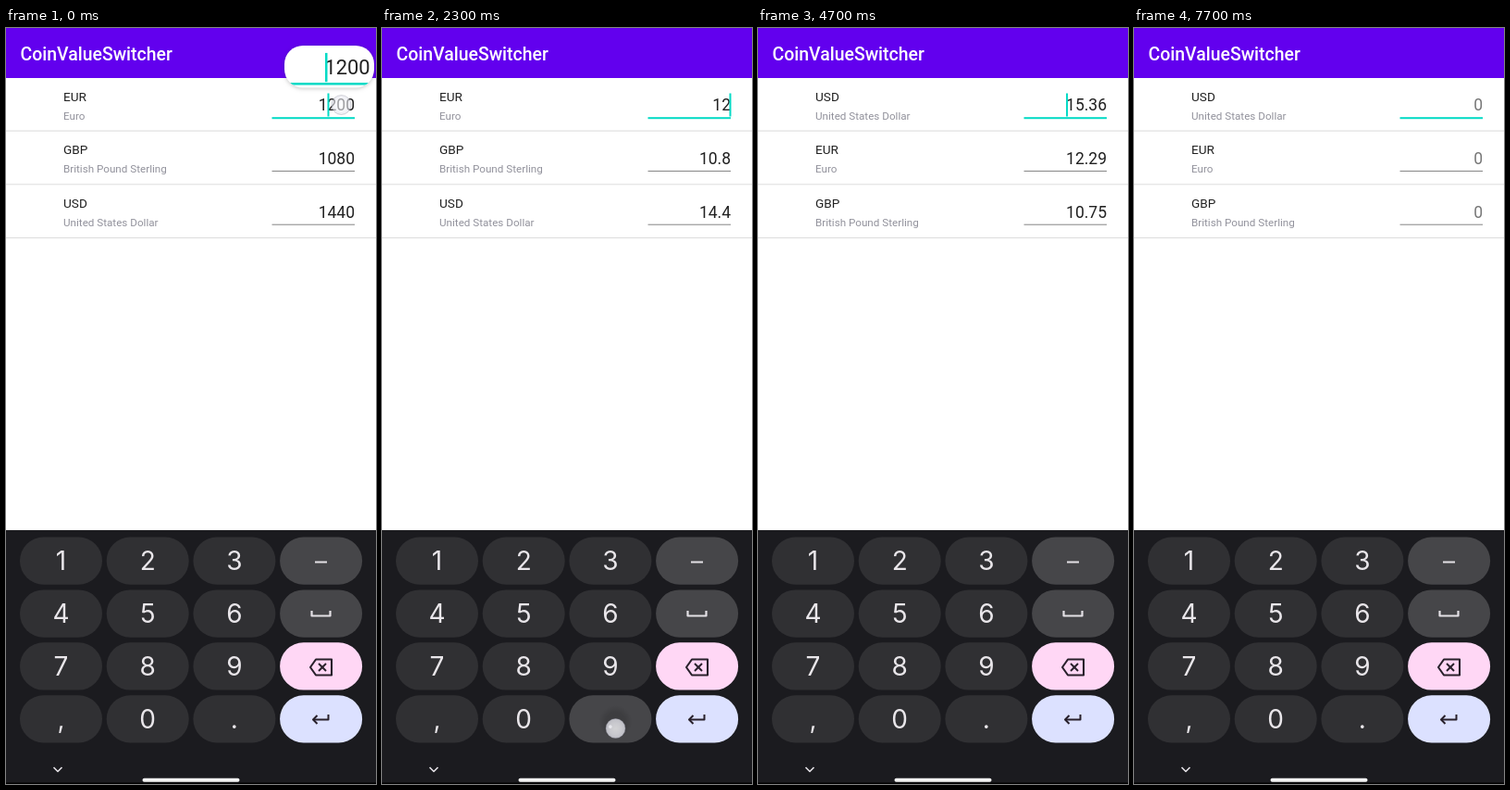
An HTML page with a canvas that plays this animation: 400x816 px, repeating every 8000 ms.

```html
<!DOCTYPE html>
<html lang="en">
<head>
<meta charset="utf-8">
<title>Currency list</title>
<style>
html, body { margin: 0; width: 100%; height: 100%; overflow: hidden; background: #fff; }
canvas { display: block; width: 400px; height: 816px; }
</style>
</head>
<body>
<canvas id="stage"></canvas>
<script>
const W = 400, H = 816, LOOP = 8000, STEP = 100;
const TEAL = '#03dac5', INK = '#212121';
const TOP = 53.5, PITCH = 57.75, RIGHT = 377, KEYBOARD = 542;
const FIELD_FONT = '17.5px Roboto, sans-serif';
const LAG = 100, DRAG = 400, HOVER = 300, LINGER = 230;
const KEYS = '123-456_789<,0.>';
const NAMES = { EUR: 'Euro', GBP: 'British Pound Sterling', USD: 'United States Dollar' };
const RATES = { EUR: { GBP: 0.9, USD: 1.2 }, USD: { EUR: 0.8, GBP: 0.7 } };

// What the finger does; everything else follows from it
const tap = (t, x, y) => ({ t, x, y });
const erase = t => tap(t, 341, 688);
const GESTURES = [
  { t: 0, drag: true },
  erase(1200), erase(1400),
  tap(2300, 252.5, 756), tap(2900, 152, 697),
  tap(3700, 203.5, 192),
  tap(5200, 360, 84),
  { t: 5900, drag: true },
  ...Array.from({ length: 5 }, (_, i) => erase(6900 + 140 * i))
];

const canvas = document.getElementById('stage');
const ctx = canvas.getContext('2d');
const dpr = window.devicePixelRatio || 1;
canvas.width = W * dpr;
canvas.height = H * dpr;

const clamp = v => Math.min(1, Math.max(0, v));
const mix = (a, b, p) => a + (b - a) * p;

const keyAt = ({ x, y }) => y > KEYBOARD
  ? Math.floor((y - 547) / 57) * 4 + Math.floor((x - 13) / 93.7) : -1;

function caretX(typed, n) {
  ctx.font = FIELD_FONT;
  return Math.min(RIGHT - 1.5, RIGHT - ctx.measureText(typed.slice(n)).width);
}

function convert(typed, from, to) {
  if (from === to || typed === '') return typed;
  return String(+(parseFloat(typed) * RATES[from][to]).toFixed(2));
}

function applyDrag(s, age) {
  const p = clamp(age / (DRAG - LAG));
  s.x = mix(s.x, caretX(s.typed, s.typed.length), p);
  s.n = s.typed.length;
  s.touched += Math.min(age, DRAG);
  s.handle = age < DRAG ? 0 : 1;
  if (age < DRAG) s.lens = s.x - 9.4 * (1 - p);
}

function applyTap(s, g, age) {
  const key = keyAt(g);
  if (key >= 0) s.handle *= clamp(1 - age / 130);
  if (age < LAG) return;
  const row = Math.floor((g.y - TOP) / PITCH);
  if (key >= 0) {
    s.typed = KEYS[key] === '<' ? s.typed.slice(0, -1) : s.typed + KEYS[key];
    s.n = s.typed.length;
  } else if (row > 0) {
    s.before = { order: s.order, typed: s.typed, age: age - LAG };
    const code = s.order[row];
    s.typed = convert(s.typed, s.order[0], code);
    s.order = [code, ...s.order.filter(c => c !== code)];
    s.n = 0;
  } else {
    s.n = [...s.typed].filter((_, i) =>
      (caretX(s.typed, i) + caretX(s.typed, i + 1)) / 2 < g.x).length;
    s.handle = 1;
  }
  s.x = caretX(s.typed, s.n);
}

function stateAt(t) {
  const s = { order: ['EUR', 'GBP', 'USD'], typed: '1200', n: 1, handle: 0, lens: 0 };
  s.x = caretX(s.typed, s.n);
  for (const g of GESTURES.filter(g => g.t <= t)) {
    s.touched = g.t;
    if (g.drag) applyDrag(s, t - g.t);
    else applyTap(s, g, t - g.t);
  }
  s.caret = s.typed && (t - s.touched) % 1000 < 500 ? s.x : 0;
  return s;
}

function text(str, x, y, font, color, align = 'left') {
  ctx.font = font;
  ctx.fillStyle = color;
  ctx.textAlign = align;
  ctx.fillText(str, x, y);
}

function rect(x, y, w, h, color) {
  ctx.fillStyle = color;
  ctx.fillRect(x, y, w, h);
}

function pill(x, y, w, h, r, color) {
  ctx.beginPath();
  ctx.roundRect(x, y, w, h, r);
  ctx.fillStyle = color;
  ctx.fill();
}

function line(points, color, width, closed) {
  ctx.beginPath();
  points.forEach(([x, y]) => ctx.lineTo(x, y));
  if (closed) ctx.closePath();
  ctx.strokeStyle = color;
  ctx.lineWidth = width;
  ctx.lineJoin = 'round';
  ctx.stroke();
}

function drawField(value, y, focused, caret) {
  text(value || '0', RIGHT, y + 35.7, FIELD_FONT, value ? INK : '#777', 'right');
  rect(287.5, y + 42.7, 89.5, focused ? 2 : 1, focused ? TEAL : '#858585');
  if (caret) rect(caret, y + 17, 2, 25, TEAL);
}

function drawRow(code, value, y, focused, caret) {
  rect(0, y, W, PITCH, '#fff');
  text(code, 62, y + 25, '13.6px Roboto, sans-serif', INK);
  text(NAMES[code], 62, y + 45, '11.67px Roboto, sans-serif', '#92929c');
  drawField(value, y, focused, caret);
  rect(0, y + PITCH - 0.7, W, 1, '#dcdcdc');
}

function drawList({ order, typed, before, caret }) {
  const old = before || { order, typed, age: LOOP };
  const p = clamp((old.age - 58) / 250);
  const ease = 0.5 - Math.cos(Math.PI * p) / 2;
  const rowY = i => TOP + PITCH * mix(old.order.indexOf(order[i]), i, ease);
  const src = old.age < 500 ? old : { order, typed };
  drawRow(order[0], typed, rowY(0), false, 0);
  for (const i of [2, 1]) {
    drawRow(order[i], convert(src.typed, src.order[0], order[i]), rowY(i), false, 0);
  }
  drawRow(order[0], typed, TOP, true, caret);
}

function drawHandle({ x, handle }) {
  const r = 9.7, y = 107.5, d = r * Math.SQRT1_2;
  ctx.globalAlpha = handle;
  ctx.beginPath();
  ctx.moveTo(x, y - 2 * d);
  ctx.lineTo(x + d, y - d);
  ctx.arc(x, y, r, -Math.PI / 4, Math.PI * 1.25);
  ctx.fillStyle = TEAL;
  ctx.fill();
  ctx.globalAlpha = 1;
}

function drawLens({ typed, lens }) {
  if (!lens) return;
  ctx.save();
  ctx.shadowColor = 'rgba(0,0,0,.22)';
  ctx.shadowBlur = 4 * dpr;
  ctx.shadowOffsetY = dpr;
  pill(301, 19, 97, 45.5, 20, '#fff');
  ctx.restore();
  ctx.save();
  ctx.clip();
  ctx.translate(349.5, 50.3);
  ctx.scale(1.25, 1.25);
  ctx.translate(-lens - 3.6, -TOP - 35.7);
  drawField(typed, TOP, true, lens);
  ctx.restore();
}

function keyColor(i, pressed) {
  if (KEYS[i] === '<') return pressed ? '#9aa8e4' : '#ffd7f5';
  if (KEYS[i] === '>') return '#dce1ff';
  return i % 4 === 3 || pressed ? '#464649' : '#303033';
}

function drawKeyboard(t) {
  rect(0, KEYBOARD, W, H, '#1b1b1f');
  rect(0, 814.5, W, 2, '#000');
  const down = GESTURES.filter(g => t >= g.t && t < g.t + 200).map(keyAt);
  [...KEYS].forEach((label, i) => {
    const x = 15 + (i % 4) * 93.7, y = 549.5 + Math.floor(i / 4) * 56.9;
    pill(x, y, 89, 51.3, 25.6, keyColor(i, down.includes(i)));
    if (i % 4 < 3) text(label, x + 44.5, y + 35.6, '28px Inter, sans-serif', '#e9e6ea', 'center');
  });
  const light = '#e4e1e6', dark = '#28202b';
  rect(334, 575.5, 13, 2, light);
  line([[330.5, 629], [330.5, 634.5], [350.5, 634.5], [350.5, 629]], light, 2.2);
  line([[329, 690], [335, 681.5], [352, 681.5], [352, 698.5], [335, 698.5]], dark, 2.1, true);
  line([[338, 686], [346, 694]], dark, 2);
  line([[346, 686], [338, 694]], dark, 2);
  line([[348.5, 741], [348.5, 746.5], [332, 746.5]], dark, 2);
  line([[336.5, 742], [332, 746.5], [336.5, 751]], dark, 2);
  line([[51.5, 798], [56, 802.5], [60.5, 798]], light, 1.6);
  pill(147.5, 809.7, 105, 4, 2, '#f4f4f4');
}

function glow(x, y, r, inner, mid, outer) {
  const g = ctx.createRadialGradient(x, y, 0, x, y, r);
  [inner, mid, outer].forEach((color, i) => g.addColorStop([0, 0.6, 1][i], color));
  ctx.beginPath();
  ctx.arc(x, y, r, 0, Math.PI * 2);
  ctx.fillStyle = g;
  ctx.fill();
}

function drawTouch(t, s) {
  const g = GESTURES.find(g => g.drag
    ? t >= g.t && t < g.t + DRAG
    : t >= g.t - HOVER && t < g.t + LINGER);
  if (!g) return;
  const x = g.drag ? s.x + 15 : g.x, y = g.drag ? 83 : g.y;
  if (!g.drag) glow(x, y - 7, 18, 'rgba(0,0,0,.16)', 'rgba(0,0,0,.12)', 'rgba(0,0,0,0)');
  const fill = g.drag ? 0.6 : 0.78;
  glow(x, y, 10.5, `rgba(252,252,254,${fill})`, `rgba(240,240,246,${fill})`, `rgba(225,225,234,${fill})`);
  ctx.strokeStyle = 'rgba(140,140,155,.35)';
  ctx.lineWidth = 1;
  ctx.stroke();
}

function draw(t) {
  ctx.setTransform(dpr, 0, 0, dpr, 0, 0);
  rect(0, 0, W, H, '#fff');
  const s = stateAt(t);
  drawList(s);
  rect(0, 0, W, 54, '#6200ee');
  text('CoinValueSwitcher', 15.5, 34.6, '500 19.45px Roboto, sans-serif', '#fff');
  drawHandle(s);
  drawKeyboard(t);
  drawLens(s);
  drawTouch(t, s);
}

let start;
function tick(now) {
  if (start === undefined) start = now;
  const t = Math.max(0, now - start) % LOOP;
  draw(Math.floor(t / STEP) * STEP);
  requestAnimationFrame(tick);
}
draw(0);
requestAnimationFrame(tick);
</script>
</body>
</html>
```
